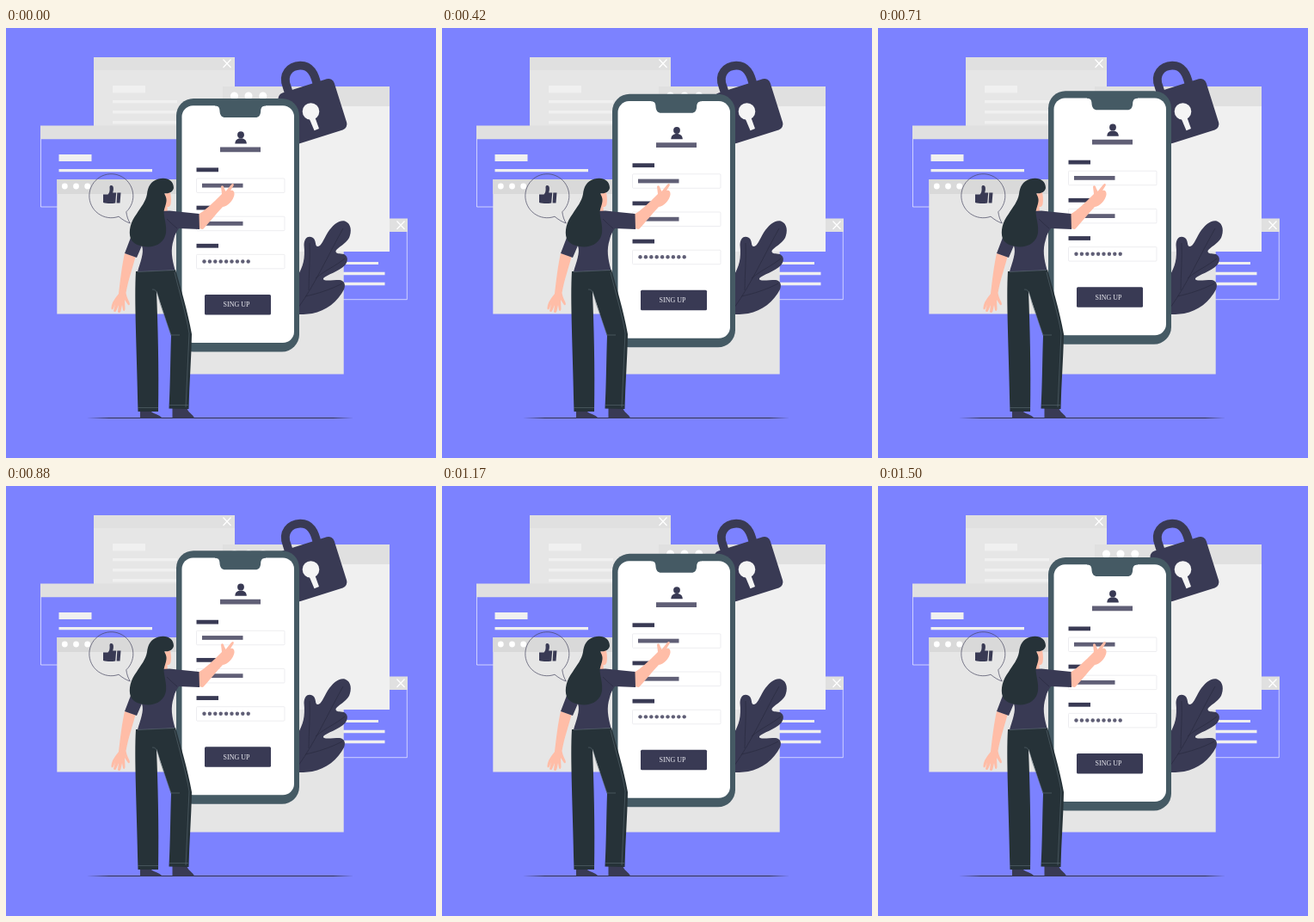
An HTML page for the animation above (1540 ms loop, 500x500 px).

```html
<!DOCTYPE html>
<html lang="en">
<head>
<meta charset="utf-8">
<title>Sign up</title>
<style>
html, body { margin: 0; width: 100%; height: 100%; overflow: hidden; background: #7c82ff; }
svg { display: block; width: 100vw; height: 100vh; }
.ink { fill: #393a54; }
.night { fill: #263238; }
.skin { fill: #ffbda7; }
.bar { fill: #e0e0e0; }
.page { fill: #e6e6e6; }
.pale { fill: #f0f0f0; }
.white { fill: #fff; }
.soft { fill: #605f76; }
.line { fill: none; stroke: #fff; }
.vein { fill: none; stroke: #2b2c42; stroke-width: .8; }
.seam { fill: none; stroke: #64757c; stroke-width: .5; }
.field { fill: #fff; stroke: #e6e6ea; stroke-width: .7; }
text { font: 8px "Liberation Serif", Times, serif; fill: #ececf2; text-anchor: middle; }
</style>
</head>
<body>
<svg viewBox="0 0 500 500">
  <rect width="500" height="500" fill="#7c82ff"/>

  <g id="windows">
    <path class="page" d="M102 34h164v90h-164z"/>
    <path class="bar" d="M102 34h164v15h-164z"/>
    <path class="line" d="M252.500 36.500l9 9.500m0-9.500l-9 9.500" stroke-width="1.200"/>
    <path class="pale" d="M124 67h38v8.500h-38zM124 84h75v3.500h-75zM124 96h75v3.500h-75zM124 108h75v3.500h-75z"/>

    <path class="line" d="M40.500 128v80h60" stroke-width=".8" stroke-opacity=".8"/>
    <path fill="#7c82ff" d="M41 128h170v48H41z"/>
    <path class="bar" d="M40 113.500h165v15.700H40z"/>
    <path class="pale" d="M61.500 147h38v8h-38zM61.500 164h108.500v3.200h-108.500z"/>

    <path class="line" d="M466.300 236v79.700h-80" stroke-width=".8" stroke-opacity=".8"/>
    <path class="bar" d="M380 221.500h87v15.500h-87z"/>
    <path class="line" d="M454.500 224.500l9 9.500m0-9.500l-9 9.500" stroke-width="1.200"/>
    <path class="pale" d="M380 272h53v3h-53zM380 283.800h60.500v3.400H380zM380 295.800h60.500v3.400H380z"/>
    <path fill="#e5e5e5" d="M205 240h187.700v162.500H205z"/>

    <path class="pale" d="M252 68h194v192H252z"/>
    <path class="bar" d="M252 68h194v23H252z"/>
    <g class="white">
      <circle cx="265.500" cy="79" r="4.500"/><circle cx="282" cy="79" r="4.500"/><circle cx="298.800" cy="79" r="4.500"/>
    </g>

    <path class="page" d="M59.300 176H205v156.500H59.300z"/>
    <path fill="#d9d9d9" d="M59.300 176H205v17H59.300z"/>
    <g class="white">
      <circle cx="68.300" cy="184" r="3.400"/><circle cx="81.500" cy="184" r="3.400"/><circle cx="94.700" cy="184" r="3.400"/>
    </g>
  </g>

  <g id="bubble">
    <path d="M131 219.200A25.500 25.500 0 1 1 139.800 213.800C140.500 219 142 223.500 144.300 227C139.500 225.500 135 222.500 131 219.200z" fill="none" stroke="#45455f" stroke-width=".7"/>
    <path class="ink" d="M113 193.500h5.500c2-2 2.300-4.500 2-8.500c.2-2.700 3.800-2.500 4.300.5c.4 2.200-.2 4.200-.6 6h4l-1 12c-4 .8-10 .8-14.200-.5zM129.300 191.500h4.200l-1 12h-3.900z"/>
  </g>

  <g id="lock">
    <path d="M330 79L326.500 68C321 54 330 44 342 43.700C354 43.500 359 53 362 67" fill="none" stroke="#393a54" stroke-width="9.800"/>
    <rect class="ink" x="-34" y="-31" width="68" height="62" rx="7" transform="translate(356.500 97) rotate(-17.500)"/>
    <circle cx="354.500" cy="97" r="9.800" fill="#f5f5f5"/>
    <path fill="#f5f5f5" d="M352.500 105L359 103L364 117L358.500 119.200z"/>
  </g>

  <g id="leaf">
    <path class="ink" d="M334 333L338 290C346 277 348 268 346.500 252C347 243 352 241 357 244C361 247 359 253 362 254C367 254 369 246 374 238C380 229 387 223 394 224.500C402 227.500 402 237 399 244C395 251 386 255 383.500 259C383 263 388 262 393 263C398 266 398 271 394 276C387 283 373 287 369 291C368 295 378 293 388 293C394 294 395 299 393 304C386 318 372 329 356 332C350 333 342 333 334 333z"/>
    <path class="vein" d="M340 325C360 297 374 265 392 233M352 305C352 287 354 268 353 250M360 291C372 281 383 277 394 268M348 312C362 309 378 304 391 297"/>
  </g>

  <g id="phone">
    <rect x="198" y="82.500" width="143" height="294.500" rx="20" fill="#455a64"/>
    <rect class="white" x="204.500" y="90.800" width="130.500" height="275.700" rx="13"/>
    <path fill="#455a64" d="M243 89.500v1.500C247 91 248.300 93 248.500 97C248.800 102 251 104.500 255 104.500H290C294 104.500 296 102 296.200 97C296.400 93 298 91 302 91v-1.500z"/>
    <circle class="ink" cx="273" cy="124.700" r="3.900"/>
    <path class="ink" d="M266.300 135c0-4 2.500-6.300 6.700-6.300s6.800 2.300 6.800 6.300z"/>
    <path class="soft" d="M249 139h47v5.700h-47z"/>
    <rect class="ink" x="231" y="310.500" width="77" height="23.500" rx="1.500"/>
    <text x="268" y="325">SING UP</text>
  </g>

  <g id="woman">
    <path d="M94 453.500L120 452.900H380L404 453.500L380 454H120z" fill="#33344c"/>
    <path class="ink" d="M156 445h12c2 3.500 11 4.500 13.500 8.500H156zM193.500 441H210c1 6 7.500 8 9 12.500h-25.500z"/>
    <path class="night" d="M151 283C149 315 152 370 153.500 446H177C178 395 176.500 345 175 306L192 358C191 388 191 415 189.500 442.500L212.500 443C213 415 215.500 385 216 356C211 328 203 302 197 281z"/>
    <path class="seam" d="M170 304C177 303 177 315 180 323L192 357L202 357M196 284C201 305 210 335 213 355L209 441M153 441.500h24M190 438.500h22"/>
    <path class="skin" d="M138 262C135 275 133 292 131 309C127 314 123 319 122.500 325C122 328 124 328 125 326L127 321L125 329C126 331 128 330 128.500 328L131 322L130 330C131 332 133 331 133.500 329L135 322L136 328C137 330 138 329 138.500 327L138 316L142 322C144 323 144.500 321 143 318C141 314 140 311 139.500 308C142 293 147 280 150.500 266z"/>
    <path class="skin" d="M223 217C232 212 240 204 251 193L250 184.500C251 182.500 253 183 253.500 186L255.500 190L262 182C264 180 265.500 181.500 264.500 183.500L261 189C264 188 266 190 265.500 194C264 201 258 207 252 208C244 216 236 227 229 234L223 233z"/>
    <path class="skin" d="M180 194L191 191C191.700 195 192.500 200 191.500 205C190.500 208.500 188.500 208 187.500 208L188 215L180 218z"/>
    <path class="ink" d="M151 228L138 262L152 267L158 253C161 262 156 272 153 283.500L196.500 281.500C193 268 191 258 195 246C196 240 199 236 201 233L225 234L224.500 216L190 212.500L180 213z"/>
    <path class="vein" d="M187 222C191 226 194 229 199 233M158 253C159 247 161 243 163 240"/>
    <path class="seam" d="M153 283.500L196.500 281.500"/>
    <path class="night" d="M195 186C195 177 187 173 177 175.500C168 178 165 185 164 193C162.500 202 157 208 152 216C145 225 142 236 145 245C148 252 157 254 165 254.500C176 254.500 185 248 186 238C187 230 184 222 183.500 214C184 209 187 204 186.500 199C186 195 184 194 184.500 192C189 193 194 191 195 186z"/>
  </g>
</svg>

<script>
const phone = document.getElementById("phone");

function add(tag, attrs) {
  const el = document.createElementNS("http://www.w3.org/2000/svg", tag);
  for (const name in attrs) el.setAttribute(name, attrs[name]);
  phone.append(el);
}

for (let row = 0; row < 3; row++) {
  const y = 163 + row * 44.2;
  add("rect", { class: "ink", x: 221.5, y, width: 25.500, height: 4.800 });
  add("rect", { class: "field", x: 221.5, y: y + 12.500, width: 102.500, height: 16.500, rx: 1 });
  if (row < 2) add("rect", { class: "soft", x: 228, y: y + 18.300, width: 47.500, height: 4.800 });
}
for (let i = 0; i < 9; i++) {
  add("circle", { class: "soft", cx: 230.500 + i * 6.400, cy: 272, r: 2.200 });
}

// Steady rise and fall at 24 steps per second.
const LOOP = 1540, PEAK = 17, RATE = 0.515;
const lift = step => 9.3 - RATE * Math.abs(step - PEAK);
const start = performance.now();

function draw(now) {
  const t = Math.max(0, now - start) % LOOP;
  const step = Math.min(36, Math.floor(t * 0.024 + 0.1));
  phone.setAttribute("transform", `translate(0 ${-lift(step).toFixed(2)})`);
  requestAnimationFrame(draw);
}
draw(start);
</script>
</body>
</html>
```
